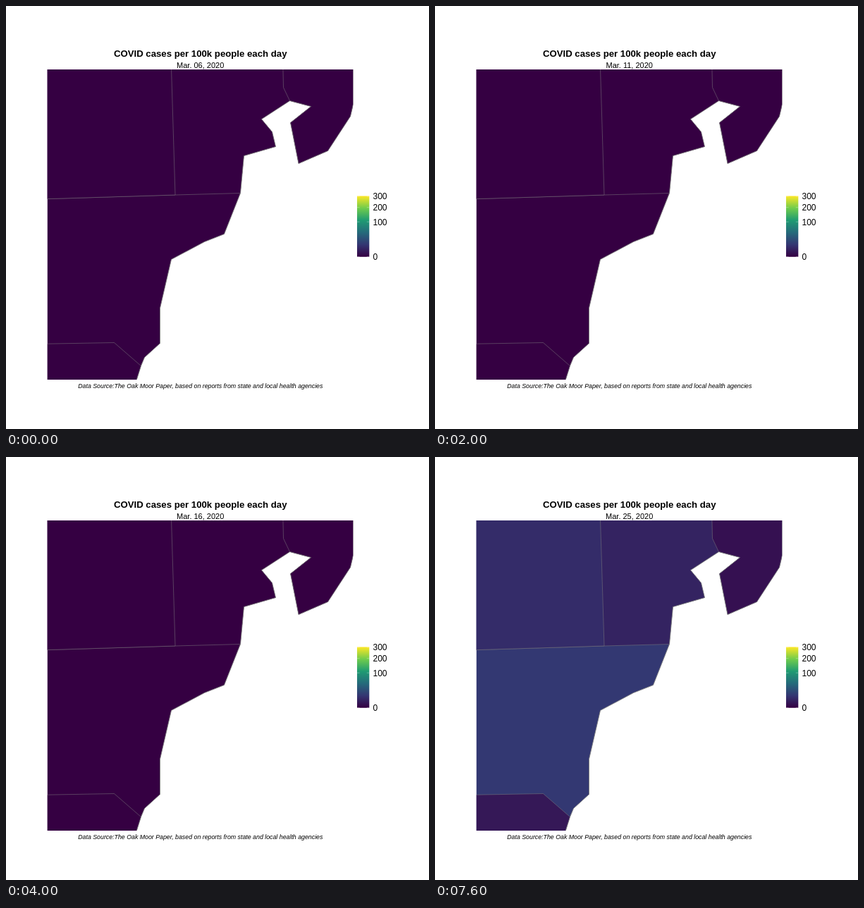
Recreate the animation shown at these times as an HTML page. Size 600 px wide and 600 px high, loop 8000 ms.

```html
<!DOCTYPE html>
<html lang="en">
<head>
<meta charset="utf-8">
<title>COVID cases per 100k people each day</title>
<style>
  html, body { margin: 0; width: 100%; height: 100%; overflow: hidden; background: #fff; }
  svg { display: block; width: 100vw; height: 100vh; }
  text { font-family: "Liberation Sans", Arial, Helvetica, sans-serif; fill: #000; }
  .mid { text-anchor: middle; }
  #counties { stroke: #7f7f7f; stroke-width: 0.5; }
  #coast { fill: none; stroke: #7f7f7f; stroke-width: 0.9; }
</style>
</head>
<body>
<svg viewBox="0 0 600 600">
  <defs>
    <clipPath id="panel"><rect x="58.8" y="90" width="433.7" height="440"/></clipPath>
    <clipPath id="land"><polygon id="outline" points="50,80 492,80 492,139 488,156 456,205 414.5,223
      403,165 432,142 402,134 362,160 377,178 382,199 337,212 332,265 309,323 281,334 234,359
      218,428 218,478 196,498 191,510 185,529 181,540 50,540"/></clipPath>
    <linearGradient id="scale" x1="0" y1="1" x2="0" y2="0"></linearGradient>
  </defs>
  <text class="mid" x="275.7" y="72" font-size="13.2" font-weight="bold">COVID cases per 100k people each day</text>
  <text class="mid" id="date" x="275.7" y="88" font-size="11"></text>
  <g clip-path="url(#panel)">
    <g transform="translate(0.5 0.5)">
      <g id="counties" clip-path="url(#land)"></g>
      <use id="coast" href="#outline"/>
    </g>
  </g>
  <g id="legend"><rect x="498" y="269.5" width="17.3" height="86.3" fill="url(#scale)"/></g>
  <text class="mid" x="275.8" y="542" font-size="8.8" font-style="italic">Data Source:The Oak Moor Paper, based on reports from state and local health agencies</text>
</svg>
<script>
const DAY_MS = 400, DAYS = 20, FIRST_DAY = 6, MAX_CASES = 300;
const $ = id => document.getElementById(id);

function add(parent, tag, attrs) {
  const el = document.createElementNS('http://www.w3.org/2000/svg', tag);
  for (const key in attrs) el.setAttribute(key, attrs[key]);
  parent.appendChild(el);
  return el;
}

// Counties overlap in paint order and are trimmed to the coast.
// Cases rise from the start day to the peak, as a power of the time passed.
const counties = [
  { shape: '40,70 510,70 510,550 40,550', start: 11, peak: 13, power: 1 },
  { shape: '40,70 510,70 510,265 332,265 239.5,267.5 40,273.7', start: 10, peak: 5.1, power: 1 },
  { shape: '40,70 233.5,70 239.5,267.5 40,273.7', start: 10, peak: 7.9, power: 1 },
  { shape: '392,70 393,115 402,134 402,250 510,250 510,70', start: 11, peak: 1.1, power: 2 },
  { shape: '40,479 153,477 191,510 191,550 40,550', start: 14, peak: 2.4, power: 2 }
];
for (const county of counties)
  county.el = add($('counties'), 'polygon', { points: county.shape });

const palette = ['350042', '343672', '256a7b', '1f9b72', '70cc4c', 'fde725'];
palette.forEach((color, i) =>
  add($('scale'), 'stop', { offset: i / (palette.length - 1), 'stop-color': '#' + color }));

const level = cases => Math.sqrt(cases / MAX_CASES);
const channels = hex => [0, 2, 4].map(i => parseInt(hex.slice(i, i + 2), 16));

function colorOf(cases) {
  const pos = level(cases) * (palette.length - 1);
  const i = Math.min(Math.floor(pos), palette.length - 2);
  const from = channels(palette[i]), to = channels(palette[i + 1]);
  return `rgb(${from.map((v, c) => Math.round(v + (to[c] - v) * (pos - i))).join(',')})`;
}

for (const value of [0, 100, 200, 300]) {
  const y = 355.6 - 85.6 * level(value);
  add($('legend'), 'path', {
    d: `M498 ${y}h3.5M511.8 ${y}h3.5`, stroke: '#fff', 'stroke-width': 0.5, 'stroke-opacity': 0.6
  });
  add($('legend'), 'text', { x: 520.5, y: y + 4.35, 'font-size': 12 }).textContent = value;
}

function render(ms) {
  const day = Math.floor(ms / DAY_MS) % DAYS;
  $('date').textContent = `Mar. ${String(FIRST_DAY + day).padStart(2, '0')}, 2020`;
  for (const { el, start, peak, power } of counties) {
    const progress = Math.max(0, (day - start) / (DAYS - 1 - start));
    el.setAttribute('fill', colorOf(peak * progress ** power));
  }
}

const began = performance.now();
function tick() {
  render(performance.now() - began);
  requestAnimationFrame(tick);
}
tick();
</script>
</body>
</html>
```
